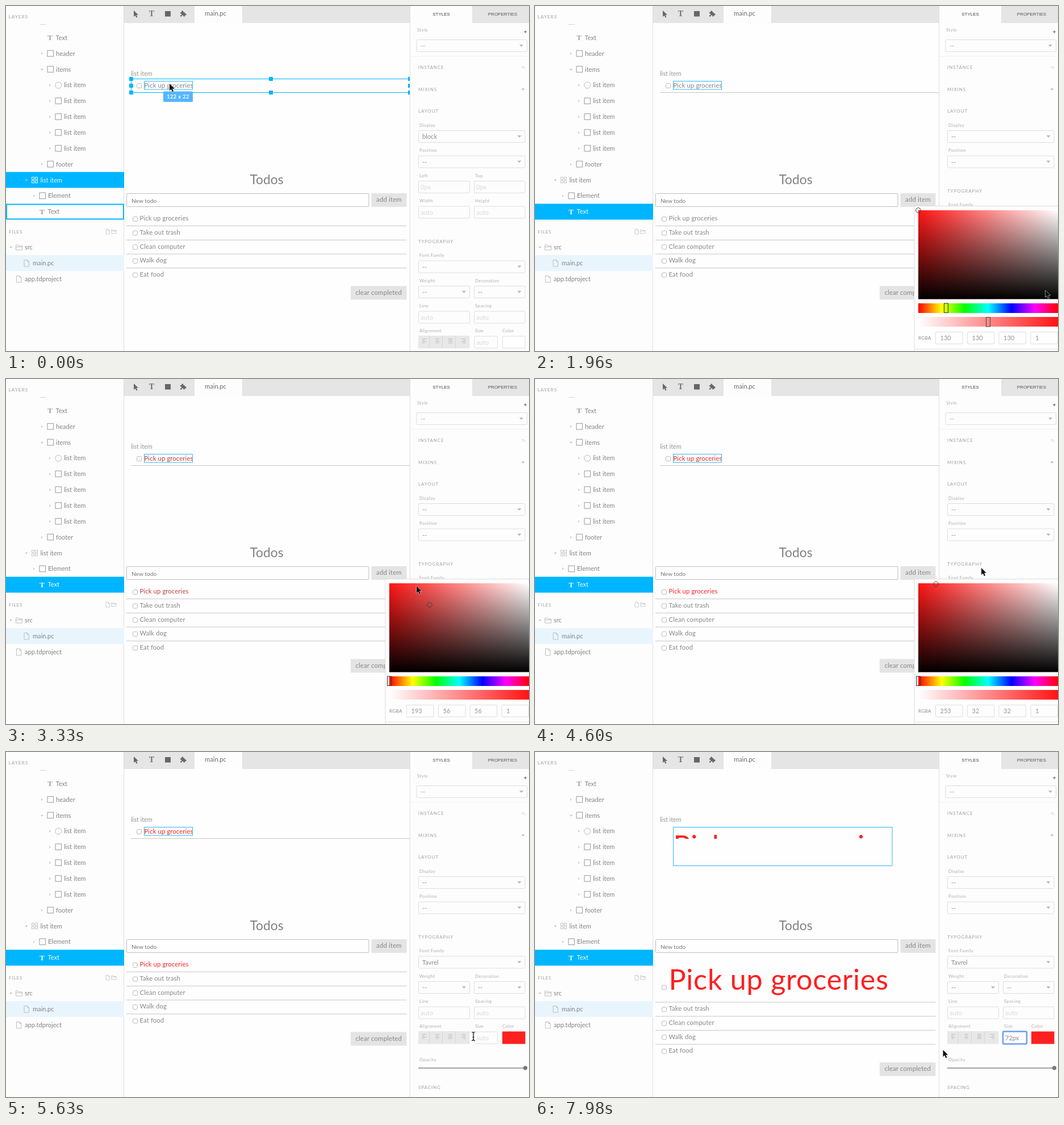
Recreate the animation shown at these times as an HTML page. Size 921x608 px, loop 8 s.

```html
<!DOCTYPE html>
<html lang="en">
<head>
<meta charset="utf-8">
<title>Todo editor</title>
<style>
html, body { margin: 0; width: 100%; height: 100%; overflow: hidden; background: #fdfdfd; }
svg { display: block; width: 921px; height: 608px; }
text { font-family: Lato, "Open Sans", sans-serif; white-space: pre; }
.todo { letter-spacing: .014em; }
.label { letter-spacing: .4px; }
.head { letter-spacing: .9px; }
.tab { font-family: "Liberation Sans", Arial, sans-serif; }
.serif { font-family: "Liberation Serif", "Noto Serif", serif; font-weight: bold; }
.badge { font-weight: bold; letter-spacing: .5px; }
</style>
</head>
<body>
<svg id="stage" viewBox="0 0 921 608" xmlns="http://www.w3.org/2000/svg"></svg>
<script>
const LOOP = 8000, BLUE = '#00b5ff', GREY = '#868686', SIDE = '#848484', EDGE = '#dedede';

// ---- markup helpers ----
const text = (x, y, s, size = 11.1, fill = GREY, more = '') =>
  `<text x="${x}" y="${y}" font-size="${size}" fill="${fill}" ${more}>${s}</text>`;
const rect = (x, y, w, h, fill, more = '') =>
  `<rect x="${x}" y="${y}" width="${w}" height="${h}" fill="${fill}" ${more}/>`;
const frame = (x, y, w, h, stroke = EDGE, more = 'rx="1.5"') =>
  rect(x + .5, y + .5, w - 1, h - 1, 'none', `stroke="${stroke}" ${more}`);
const path = (d, fill = 'none', stroke = 'none', more = '') =>
  `<path d="${d}" fill="${fill}" stroke="${stroke}" ${more}/>`;
const group = (id, body, more = '') => `<g id="${id}" ${more}>${body}</g>`;
const label = (x, y, s) => text(x, y, s, 7.9, '#adadad', 'class="label"');
const head = (x, y, s) => text(x, y, s, 8, '#a2a2a2', 'class="head"');
const plus = (x, y, c) => path(`M${x - 2.5} ${y}h5M${x} ${y - 2.5}v5`, 'none', c);
const checkbox = (x, y) => rect(x, y, 8, 8, '#fff', 'rx="2" stroke="#b8b8b8"');

function field(x, y, w, name, value, select, id = '') {
  const faint = value === 'auto' || value === '0px';
  return label(x + 2, y - 6.2, name) + frame(x, y, w, 22) +
    text(x + (select ? 7 : 4), y + 15, value, 11.1, faint ? '#d9d9d9' : '#8c8c8c', id && `id="${id}"`) +
    (select ? path(`M${x + w - 14} ${y + 9}h7l-3.5 4z`, '#b8b8b8') : '');
}

// ---- sidebar ----
const rowY = i => 56 + 27.86 * i;
const arrow = (x, y, open) => open
  ? path(`M${x - 2.5} ${y - 1}h5l-2.5 3z`, '#c4c4c4')
  : path(`M${x - 1.5} ${y - 2.5}v5l3-2.5z`, '#d0d0d0');
const icons = {
  box: (x, y) => rect(x - 5, y - 5.5, 10.5, 10.5, 'none', 'stroke="#a8a8a8" stroke-width="1.2"'),
  ring: (x, y) => `<circle cx="${x + .3}" cy="${y}" r="5.5" fill="none" stroke="#b8b8b8"/>`,
  type: (x, y, c) => text(x, y + 4.3, 'T', 13, c || '#a0a0a0', 'class="serif" text-anchor="middle"'),
  parts: (x, y, c) => [[-5, -5], [1, -5], [-5, 1], [1, 1]]
    .map(([a, b]) => rect(x + a, y + b, 4, 4, 'none', `stroke="${c || '#c4c4c4'}"`)).join('')
};
function layer(i, name, icon, x, fold, color) {
  const y = rowY(i);
  return (fold ? arrow(x - 14.5, y, fold === 'open') : '') + icons[icon](x, y, color) +
    text(x + 10, y + 3.8, name, 11.1, color || SIDE);
}
const file = (x, y, c = '#bebebe') =>
  path(`M${x} ${y - 5.5}h5.5l3 3v8.5h-8.5zM${x + 5.5} ${y - 5.5}v3h3`, 'none', c);
const folder = (x, y, c = '#bebebe') =>
  path(`M${x} ${y + 4.5}v-9h4l1.2 1.8h5.8v7.2zM${x} ${y - 1}h11`, 'none', c);

function sidebar() {
  const items = [['list item', 'ring'], ...Array(4).fill(['list item', 'box'])];
  return rect(0, 0, 208, 608, '#fdfdfd') + path('M207.5 0V608', 'none', '#dedede') +
    text(4.5, 21.6, 'LAYERS', 8.4, '#a2a2a2', 'class="head"') + path('M59 32.5h11', 'none', '#d4d4d4') +
    layer(0, 'Text', 'type', 77.5) + layer(1, 'header', 'box', 78, 'shut') + layer(2, 'items', 'box', 78, 'open') +
    items.map(([n, ic], i) => layer(i + 3, n, ic, 92, 'shut')).join('') +
    layer(8, 'footer', 'box', 78, 'shut') + layer(9, 'list item', 'parts', 50.5, 'open') +
    layer(10, 'Element', 'box', 64, 'shut') + layer(11, 'Text', 'type', 63.5) +
    group('pickItem', rect(0, 292.5, 208, 28, BLUE) + layer(9, 'list item', 'parts', 50.5, 'open', '#e4f6ff') +
      rect(1, 349.5, 206, 26, 'none', `stroke="${BLUE}" stroke-width="2"`)) +
    group('pickText', rect(0, 348.5, 208, 28, BLUE) + layer(11, 'Text', 'type', 63.5, '', '#eefaff')) +
    head(5, 401.2, 'FILES') +
    `<g transform="translate(176 397.5) scale(.75)">${file(0, 0)}${folder(13, 0)}</g>` +
    rect(0, 439, 208, 28, '#e9f5fd') +
    arrow(8.5, 425, true) + folder(17.5, 425.5) + text(33, 429, 'src', 11.1, SIDE) +
    file(32, 453) + text(47, 457, 'main.pc', 11.1, SIDE) +
    file(18.5, 481) + text(33, 485, 'app.tdproject', 11.1, SIDE);
}

// ---- canvas ----
const rule = (x, y) => path(`M${x} ${y}H${x < 215 ? 705.5 : 711}`, 'none', '#c6c6c6');
const todoRow = (y, s, last) => checkbox(223.5, y - 7) + text(235.5, y, s, 11.2, GREY, 'class="todo"') +
  (last ? '' : rule(212, y + 9.3));
const button = (x, y, w, s) => rect(x, y, w, 24, '#e4e4e4') +
  text(x + w / 2, y + 15.4, s, 11.4, GREY, 'class="todo" text-anchor="middle"');

function canvas() {
  const names = ['Take out trash', 'Clean computer', 'Walk dog', 'Eat food'];
  const knobs = [[220.5, 128.5], [466.5, 128.5], [711.5, 128.5], [220.5, 140.5], [711.5, 140.5],
    [220.5, 152.5], [466.5, 152.5], [711.5, 152.5]];
  return rect(208, 0, 504, 30, '#e5e5e5') + rect(332, 0, 84, 30, '#fdfdfd') +
    path('M225 8v11l2.6-2.4 1.9 4 1.9-.9-1.8-3.9h3.5z', '#666') +
    text(256.5, 18, 'T', 14, '#707070', 'class="serif" text-anchor="middle"') +
    rect(280, 9, 10, 9.5, '#666') +
    path('M307 11h2.4a1.7 1.7 0 1 1 2.8 0h2.6v2.6a1.7 1.7 0 1 1 0 2.6v2.3h-2.4a1.6 1.6 0 1 0-2.8 0h-2.6v-2.4a1.5 1.5 0 1 0 0-2.6z', '#666') +
    text(350, 17, 'main.pc', 11.2, '#6c6c6c') +
    text(220, 123, 'list item', 10.9, '#959595') +
    group('cardSmall', checkbox(230.5, 136.5) + rule(220, 152.5)) +
    '<clipPath id="card"><rect x="220" y="128" width="491" height="25"/></clipPath>' +
    `<g clip-path="url(#card)">${text(243.5, 144, 'Pick up groceries', 11.2, GREY, 'id="cardText" class="todo"')}</g>` +
    '<rect id="hover" fill="none" stroke="#31b7f3"/>' +
    '<clipPath id="middle"><rect x="208" y="30" width="504" height="578"/></clipPath>' +
    group('selection', rect(220.5, 128.5, 491, 24, 'none', `stroke="${BLUE}"`) +
      knobs.map(([x, y]) => rect(x - 3.5, y - 3.5, 7, 7, BLUE)).join('') +
      rect(277, 150.5, 52, 18.5, '#55b6fd', 'rx="1.5"') +
      text(303, 163.2, '122 x 22', 9.1, '#fff', 'class="badge" text-anchor="middle"'), 'clip-path="url(#middle)"') +
    text(459, 314, 'Todos', 22.8, '#828282', 'text-anchor="middle"') +
    frame(212, 330, 427.5, 24, '#bdbdbd', 'rx="1"') + text(221, 347, 'New todo', 10.2, '#767676') +
    button(643.5, 330, 62, 'add item') +
    group('firstBox', checkbox(223.5, 371.5)) +
    text(235.5, 378.4, 'Pick up groceries', 11.2, GREY, 'id="firstText" class="todo"') +
    group('rest', rule(212, 387.5) +
      names.map((n, i) => todoRow(403.1 + 24.65 * i, n, i === 3)).join('') +
      button(607, 493.5, 98.5, 'clear completed'));
}

// ---- style panel ----
function typography() {
  const align = [0, 1, 2, 3].map(i => {
    const x = 733 + 23 * i, short = i === 2 ? 7 : 4, off = [0, 1.5, 0, 3][i];
    return path(`M${x} 497.5h7M${x + off} 500h${short}M${x} 502.5h7M${x + off} 505h${short}`, 'none', '#bdbdbd') +
      (i ? path(`M${x - 10.5} 492V514`, 'none', '#d6d6d6') : '');
  }).join('');
  return head(726, 328.5, 'TYPOGRAPHY') + field(726, 359.5, 188.5, 'Font Family', '--', true, 'family') +
    field(726, 404, 91, 'Weight', '--', true) + field(824, 404, 90.5, 'Decoration', '--', true) +
    field(726, 448.5, 91, 'Line', 'auto') + field(824, 448.5, 90.5, 'Spacing', 'auto') +
    label(728, 486, 'Alignment') + rect(726, 492, 90.5, 22.5, '#e8e8e8') + align +
    field(824, 492.5, 42, 'Size', 'auto', false, 'size') +
    rect(824, 492.5, 42, 22, 'none', 'id="focus" rx="2" stroke="#6f9ff2" stroke-width="2.6"') +
    rect(829, 496, 1, 15, '#444', 'id="caret"') +
    label(874, 486, 'Color') + rect(874, 492.5, 40.5, 22, '#fff', 'id="swatch"') + frame(874, 492.5, 40.5, 22, EDGE, 'id="swatchEdge"') +
    label(728, 545.3, 'Opacity') + path('M726 557H912', 'none', '#a4a4a4', 'stroke-width="2"') +
    '<circle cx="914.5" cy="556.8" r="3.6" fill="#777"/>' + head(726, 594, 'SPACING');
}

function panel() {
  return rect(712, 0, 209, 608, '#fdfdfd') + rect(821, 0, 100, 30, '#e5e5e5') + path('M711.5 0V608', 'none', '#dedede') +
    text(766.5, 17.3, 'STYLES', 8, '#444', 'class="tab" text-anchor="middle"') +
    text(874.5, 17.3, 'PROPERTIES', 8, '#555', 'class="tab" text-anchor="middle"') +
    label(724, 45.3, 'Style') + plus(914.5, 45.5, '#666') + frame(722.5, 59, 195.5, 22) +
    text(730, 74, '--', 11.1, '#a4a4a4') + path('M904 68h7l-3.5 4z', '#b8b8b8') +
    path('M712 88.5H921', 'none', '#f1f1f1') +
    head(726, 110.8, 'INSTANCE') + path('M909 107.5h4a1.8 1.8 0 0 1 0 3h-2M910.5 105.5l-2 2 2 2', 'none', '#dadada') +
    head(726, 150, 'MIXINS') + plus(910.5, 146.5, '#b4b4b4') + head(726, 188.3, 'LAYOUT') +
    field(726, 219, 188.5, 'Display', '--', true, 'display') + field(726, 263.5, 188.5, 'Position', '--', true) +
    group('offsets', field(726, 308, 91, 'Left', '0px') + field(824, 308, 90.5, 'Top', '0px') +
      field(726, 352.5, 91, 'Width', 'auto') + field(824, 352.5, 90.5, 'Height', 'auto')) +
    group('typography', typography());
}

// ---- colour picker ----
const PICK = { x: 675, y: 360, w: 246, h: 156.5 };
function gradient(id, stops, down) {
  return `<linearGradient id="${id}" x2="${down ? 0 : 1}" y2="${down ? 1 : 0}">` + stops.map((c, i) =>
    `<stop offset="${i / (stops.length - 1)}" stop-color="${c}"/>`).join('') + '</linearGradient>';
}
function picker() {
  const { x, y, w, h } = PICK;
  return gradient('fade', ['#ff1414', '#ffffff']) + gradient('dark', ['rgba(0,0,0,0)', '#000'], true) +
    gradient('alpha', ['#ffffff', '#ff1414']) +
    gradient('hues', ['#ff0000', '#ffff00', '#00ff00', '#00ffff', '#0000ff', '#ff00ff', '#ff0000']) +
    rect(668, 352.5, 260, 262, '#fefefe', 'stroke="#dcdcdc"') +
    rect(x, y, w, h, 'url(#fade)') + rect(x, y, w, h, 'url(#dark)') +
    rect(x, 524, w, 17, 'url(#hues)') + rect(x, 548, w, 17, 'url(#alpha)') +
    '<circle id="knob" r="4.3" fill="none" stroke="#444"/>' +
    rect(0, 524, 7, 16.5, 'none', 'id="hue" stroke="#333"') +
    rect(794.5, 548.5, 7, 16.5, 'none', 'id="opacity" stroke="#444"') +
    text(675, 588, 'RGBA', 8, '#888', 'class="label"') +
    [705, 761, 816.5, 872.5].map((bx, i) => frame(bx, 574, 48.5, 22) +
      text(bx + 8.5, 589, i < 3 ? '130' : '1', 11, '#949494', i < 3 ? `id="rgb${i}"` : '')).join('') +
    path('M668 604.5H921', 'none', '#e2e2e2');
}

const arrowCursor = path('M0 0V12.2L2.8 9.6 4.9 14.3 7 13.3 5 8.8H8.8Z', '#111', '#fff', 'id="arrow" stroke-width="1" paint-order="stroke"');
const beamCursor = path('M-3-7.5Q0-7.5 0-5.5V5.5Q0 7.5-3 7.5M3-7.5Q0-7.5 0-5.5V5.5Q0 7.5 3 7.5M-1.5 1.5h3', 'none', '#111', 'id="beam" stroke-width="1.2"');

document.getElementById('stage').innerHTML =
  rect(0, 0, 921, 608, '#fefefe') + canvas() + sidebar() + panel() +
  group('picker', picker()) + arrowCursor + beamCursor;

// ---- timeline: [time, x, y, shape] held until the next step ----
const pointer = [
  [0, 288, 137, 'arrow'], [1100, 600.5, 214, 'arrow'], [1250, 0, 0, ''], [1670, 896, 503, 'arrow'], [1780, 898.5, 501, 'arrow'],
  [2260, 880, 492, 'arrow'], [2380, 826, 472, 'arrow'], [2590, 800, 452, 'arrow'], [2700, 788, 440, 'arrow'],
  [2820, 772, 425, 'arrow'], [2940, 758, 411, 'arrow'], [3090, 746, 398, 'arrow'], [3180, 735, 382, 'arrow'],
  [3330, 723, 365, 'arrow'], [3530, 718, 363, 'arrow'], [3680, 713, 362, 'arrow'], [3950, 709, 361, 'arrow'],
  [4330, 707, 361, 'arrow'], [4480, 742, 350, 'arrow'], [4600, 786, 333, 'arrow'],
  [4940, 789, 352, 'arrow'], [5040, 794, 382, 'arrow'], [5130, 800, 414, 'arrow'], [5230, 807, 444, 'arrow'],
  [5330, 813, 467, 'arrow'], [5430, 818, 484, 'arrow'], [5530, 821, 494, 'arrow'],
  [5630, 823, 501, 'beam'], [5750, 831, 502, 'beam'], [5950, 0, 0, ''],
  [7870, 722, 522, 'arrow'], [7980, 718.5, 525, 'arrow']
];
const knobPath = [
  [0, 675, 360], [2590, 800, 452], [2700, 793, 445], [2820, 782, 433], [2940, 770, 421], [3090, 760, 411], [3180, 752, 404],
  [3330, 746, 398], [3420, 735, 382], [3530, 723, 366], [3680, 717, 363], [3800, 713, 362], [3950, 710, 361.5],
  [4100, 708, 361.2], [4330, 706, 361.2]
];
const typed = [[0, 'auto'], [6790, '7'], [6970, '72'], [7180, '72p'], [7420, '72px']];
const at = (steps, t) => steps.reduce((a, s) => s[0] <= t ? s : a);

const els = {};
document.querySelectorAll('[id]').forEach(e => els[e.id] = e);
const set = (id, attrs) => { for (const k in attrs) els[id].setAttribute(k, attrs[k]); };
const show = (id, on) => set(id, { visibility: on ? 'visible' : 'hidden' });
const write = (id, s) => { if (els[id].textContent !== s) els[id].textContent = s; };

function colorAt(x, y) {
  const value = 255 * (1 - (y - PICK.y) / PICK.h), grey = value * (x - PICK.x) / PICK.w;
  return [value, grey, grey].map(Math.round);
}

function draw(t) {
  const start = t < 780, picked = t >= 2590, big = t >= 7420, open = t >= 1960 && t < 4840;
  const [, kx, ky] = at(knobPath, t);
  const rgb = picked ? colorAt(kx, ky) : [130, 130, 130];
  const color = `rgb(${rgb})`, ink = picked ? color : GREY;

  show('selection', start);
  show('pickItem', start);
  show('pickText', !start);
  show('offsets', start);
  write('display', start ? 'block' : '--');
  write('family', start ? '--' : 'Tavrel');
  set('typography', { transform: `translate(0 ${start ? 89 : 0})` });
  set('swatch', { fill: start ? '#fff' : color });
  show('swatchEdge', start);

  const size = big ? 50.4 : 11.2;
  set('cardText', { fill: ink, 'font-size': size, y: big ? 183 : 144 });
  set('firstText', { fill: ink, 'font-size': size, y: big ? 419 : 378.4 });
  set('hover', { x: 243.5, y: 132.5, width: big ? 385.5 : 85, height: big ? 68 : 14.5 });
  show('cardSmall', !big);
  set('firstBox', { transform: `translate(0 ${big ? 39.5 : 0})` });
  set('rest', { transform: `translate(0 ${big ? 53.4 : 0})` });

  set('picker', { display: open ? 'inline' : 'none' });
  set('knob', { cx: kx, cy: ky });
  set('hue', { x: picked ? 671.5 : 720.5 });
  set('opacity', { x: picked ? 921.5 : 794.5 });
  rgb.forEach((v, i) => write('rgb' + i, String(v)));

  const value = at(typed, t)[1], empty = value === 'auto';
  write('size', value);
  set('size', { fill: empty ? '#d9d9d9' : '#8c8c8c' });
  show('focus', t >= 5840);
  show('caret', t >= 5950 && t < 6490 || t >= 6790 && t < 7870);
  set('caret', { x: empty ? 829 : 828.5 + 6.2 * value.length });

  const [, px, py, shape] = at(pointer, t);
  for (const id of ['arrow', 'beam']) {
    show(id, shape === id);
    set(id, { transform: `translate(${px} ${py})` });
  }
}

const began = performance.now();
function tick() {
  draw((performance.now() - began) % LOOP);
  requestAnimationFrame(tick);
}
tick();
</script>
</body>
</html>
```
